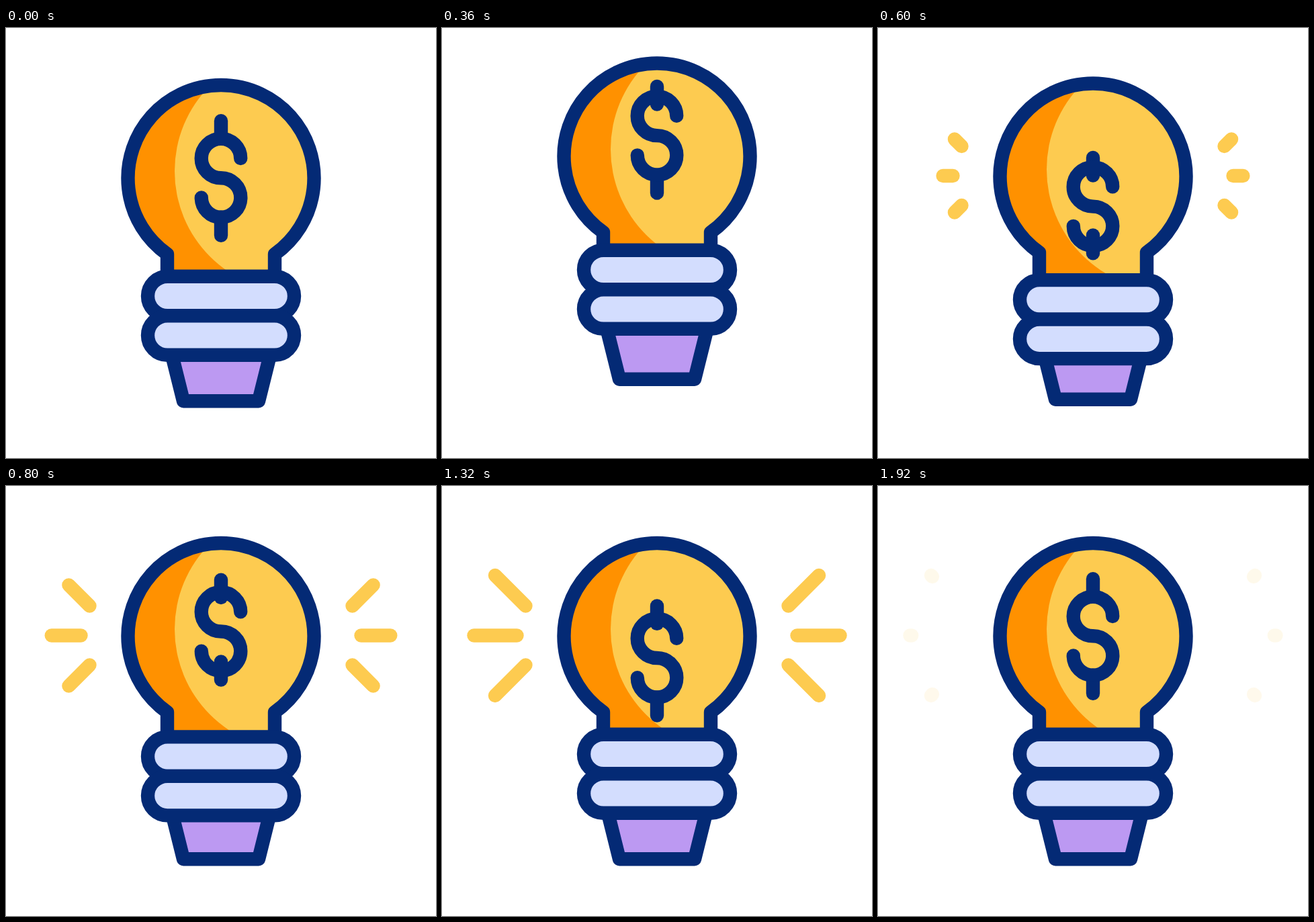
An HTML page for the animation above (2000 ms loop, 640 by 640 pixels).

```html
<!DOCTYPE html>
<html lang="en">
<head>
<meta charset="utf-8">
<title>Bright idea</title>
<style>
  html, body { margin: 0; width: 100%; height: 100%; overflow: hidden; background: #fff; }
  svg { display: block; width: 100vw; height: 100vh; }
  .line { stroke: #042a75; stroke-width: 20.4; stroke-linecap: round; stroke-linejoin: round; }
</style>
</head>
<body>
<svg viewBox="0 0 640 640" fill="none">
  <defs>
    <path id="glass" d="M240 400V336.6A138.5 138.5 0 1 1 400 336.6V400"/>
    <clipPath id="inside"><use href="#glass"/></clipPath>
  </defs>
  <g id="rays" stroke="#fdcb50" stroke-width="20.4" stroke-linecap="round"></g>
  <g id="bulb">
    <path class="line" fill="#bc99f2" d="M243 471L264 555.3H376L397 471"/>
    <g clip-path="url(#inside)">
      <use href="#glass" fill="#ff9100"/>
      <circle cx="431" cy="213" r="180" fill="#fdcb50"/>
      <g id="dollars" class="line"></g>
    </g>
    <use href="#glass" class="line"/>
  </g>
  <g id="rings" class="line" fill="#d3ddfe">
    <rect x="211" y="369.8" width="218" height="58.5" rx="29.25"/>
    <rect x="211" y="428.3" width="218" height="58.5" rx="29.25"/>
  </g>
</svg>
<script>
const LOOP = 2000, STEP = 40, LAST = 1920;
const byId = id => document.getElementById(id);

function add(parent, tag, attrs = {}) {
  const node = document.createElementNS('http://www.w3.org/2000/svg', tag);
  set(node, attrs);
  return parent.appendChild(node);
}
function set(node, attrs) {
  for (const name in attrs) node.setAttribute(name, attrs[name]);
}
const moveY = (node, y) => set(node, { transform: `translate(0 ${y})` });

// Eased value at time t through [time, value] keys.
function track(t, ...keys) {
  if (t <= keys[0][0]) return keys[0][1];
  for (let i = 1; i < keys.length; i++) {
    const [t0, a] = keys[i - 1], [t1, b] = keys[i];
    if (t < t1) {
      const p = (t - t0) / (t1 - t0);
      return a + (b - a) * p * p * (3 - 2 * p);
    }
  }
  return keys[keys.length - 1][1];
}

function makeDollar() {
  const group = add(byId('dollars'), 'g');
  const top = add(group, 'path', { d: 'M320 138.2V164.7' });
  const bottom = add(group, 'path', { d: 'M320 281.8V308.8' });
  add(group, 'path', {
    d: 'M349.2 194A29.25 29.25 0 1 0 320 223.25A29.25 29.25 0 1 1 290.8 252.5'
  });
  return { group, top, bottom };
}
function poseDollar({ group, top, bottom }, visible, y, topShift, bottomShift) {
  set(group, { visibility: visible ? 'visible' : 'hidden' });
  moveY(group, y);
  moveY(top, topShift);
  moveY(bottom, bottomShift);
}

const leaving = makeDollar(), arriving = makeDollar();

// Each ray: inner end and reach, measured from the middle of the glass.
const rays = [];
for (const side of [-1, 1]) {
  for (const tilt of [-1, 0, 1]) {
    rays.push({
      node: add(byId('rays'), 'line'),
      x: 320 + side * (tilt ? 195.5 : 208.5),
      y: 222.5 + tilt * 44,
      dx: side * (tilt ? 45.5 : 64),
      dy: tilt * 45.5
    });
  }
}

function render(t) {
  const lift = track(t, [80, 0], [400, -34], [640, 0]);
  moveY(byId('bulb'), lift);
  moveY(byId('rings'), track(t, [80, 0], [400, -40.8], [640, 9], [920, 0]));

  poseDollar(leaving, t < 1200,
    track(t, [80, 0], [400, -66], [640, 51], [1200, -240]) - lift,
    track(t, [80, 0], [400, 12.5], [640, 12.5], [1040, 0]),
    track(t, [400, 0], [640, -17], [1200, 0]));
  poseDollar(arriving, t >= 840,
    track(t, [840, 238], [1560, -39], [1760, 0]) - lift,
    track(t, [840, 0], [1560, 10], [1760, 0]), 0);

  const from = track(t, [1360, 0], [2000, 1]);
  const to = track(t, [400, 0], [1040, 1]);
  moveY(byId('rays'), lift);
  set(byId('rays'), { opacity: t > 400 ? track(t, [1760, 1], [1960, 0]) : 0 });
  for (const { node, x, y, dx, dy } of rays) {
    set(node, {
      x1: x + dx * from, y1: y + dy * from,
      x2: x + dx * to, y2: y + dy * to
    });
  }
}

const start = performance.now();
function tick() {
  const t = (performance.now() - start) % LOOP;
  render(Math.min(Math.floor(t / STEP) * STEP, LAST));
  requestAnimationFrame(tick);
}
render(0);
requestAnimationFrame(tick);
</script>
</body>
</html>
```
